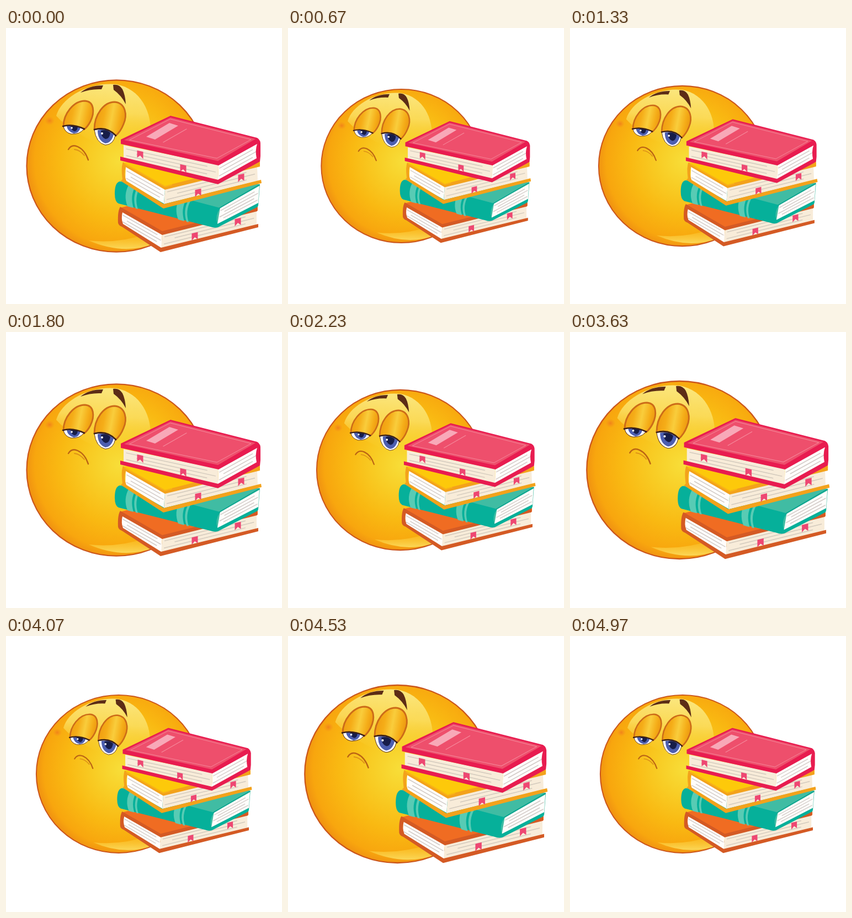
An HTML page for the animation above (5010 ms loop, 500 px wide and 500 px high).

```html
<!DOCTYPE html>
<html lang="en">
<head>
<meta charset="utf-8">
<title>Tired face with books</title>
<style>
html, body { margin: 0; width: 100%; height: 100%; overflow: hidden; background: #fff; }
svg { display: block; width: 100%; height: 100%; }
</style>
</head>
<body>
<svg viewBox="0 0 500 500">
  <defs>
    <radialGradient id="skin" gradientUnits="userSpaceOnUse" cx="206" cy="240" r="175">
      <stop offset="0" stop-color="#f8de39"/>
      <stop offset=".3" stop-color="#f8cd25"/>
      <stop offset=".62" stop-color="#f9b912"/>
      <stop offset=".88" stop-color="#f8a60e"/>
      <stop offset="1" stop-color="#ee8c12"/>
    </radialGradient>
    <linearGradient id="gloss" gradientUnits="userSpaceOnUse" x1="185" y1="103" x2="178" y2="212">
      <stop offset="0" stop-color="#fbe67c"/>
      <stop offset=".45" stop-color="#fbdf62" stop-opacity=".85"/>
      <stop offset="1" stop-color="#f8d232" stop-opacity="0"/>
    </linearGradient>
    <linearGradient id="chin" x1="0" y1="0" x2="0" y2="1">
      <stop offset="0" stop-color="#fbc62a" stop-opacity=".3"/>
      <stop offset="1" stop-color="#fbd858"/>
    </linearGradient>
    <linearGradient id="lid" x1="0" y1=".4" x2="1" y2=".6">
      <stop offset="0" stop-color="#ef9a10"/>
      <stop offset=".3" stop-color="#f5ad18"/>
      <stop offset=".55" stop-color="#f9cd3c"/>
      <stop offset=".8" stop-color="#f5ad18"/>
      <stop offset="1" stop-color="#ea930f"/>
    </linearGradient>
    <radialGradient id="blush">
      <stop offset="0" stop-color="#f07a1c" stop-opacity=".8"/>
      <stop offset="1" stop-color="#f58a1c" stop-opacity="0"/>
    </radialGradient>
  </defs>

  <g id="scene">
    <g id="face">
      <ellipse cx="200" cy="250" rx="162.5" ry="155.7" fill="url(#skin)" stroke="#cb561c" stroke-width="2.2"/>
      <path d="M91 159C100 126 150 97 200 102C243 110 267 152 261 200Q228 222 180 215Q118 190 91 159Z" fill="url(#gloss)"/>
      <path d="M150 385Q205 391 258 372L268 391Q212 412 150 385Z" fill="url(#chin)"/>
      <ellipse cx="79" cy="168" rx="9" ry="8" fill="url(#blush)"/>

      <g stroke-linecap="round" stroke-linejoin="round">
        <path d="M104 178C104 156 122 132 143 132C160 133 161 153 153 169Q148 179 141 184Q121 175 104 178Z" fill="url(#lid)" stroke="#cc6b18" stroke-width="2.8"/>
        <path d="M104 178Q122 174 141 183Q134 193 118 192Q106 189 104 178Z" fill="#fff" stroke="#5b3520" stroke-width="1"/>
        <path d="M110 178Q122 174 135 180Q133 190 123 191Q112 188 110 178Z" fill="#4c5eb0"/>
        <path d="M117 178Q124 175 130 179Q129 187 124 187Q118 185 117 178Z" fill="#171d49"/>
        <circle cx="119" cy="181" r="1.8" fill="#fff"/>
        <path d="M103 178Q121 173 142 183" fill="none" stroke="#3b2017" stroke-width="2.5"/>

        <path d="M160 184C160 157 177 134 197 134C217 136 220 158 213 174Q208 187 199 195Q182 180 160 184Z" fill="url(#lid)" stroke="#cc6b18" stroke-width="2.8"/>
        <path d="M160 184Q183 180 198 194Q195 211 180 212Q163 208 160 184Z" fill="#fff" stroke="#5b3520" stroke-width="1"/>
        <path d="M166 185Q183 181 195 193Q191 208 180 209Q166 204 166 185Z" fill="#4c5eb0"/>
        <path d="M172 186Q182 183 189 190Q187 202 180 201Q172 198 172 186Z" fill="#171d49"/>
        <circle cx="174" cy="191" r="2" fill="#fff"/>
        <path d="M160 184Q183 178 199 195" fill="none" stroke="#3b2017" stroke-width="2.7"/>

        <path d="M113 220Q119 210 130 215Q143 221 149 239" fill="none" stroke="#bb6414" stroke-width="2.4"/>
        <path d="M124 220Q134 221 142 231" fill="none" stroke="#dd9118" stroke-width="1.8"/>
      </g>
      <path d="M135 117Q150 104 176 104L173 111Q153 110 135 117Z" fill="#5c2c16"/>
      <path d="M194 103Q205 101 211 111Q216 121 217 138Q209 122 195 112Z" fill="#5c2c16"/>
    </g>
    <g id="books"></g>
  </g>
</svg>
<script>
const books = document.getElementById('books');
const scene = document.getElementById('scene');
const add = html => books.insertAdjacentHTML('beforeend', html);
const shape = (d, fill, extra = '') => add(`<path d="${d}" fill="${fill}" ${extra}/>`);
const line = (d, color, width) =>
  shape(d, 'none', `stroke="${color}" stroke-width="${width}" stroke-linecap="round" stroke-linejoin="round"`);
const mix = (a, b, k) => [a[0] + (b[0] - a[0]) * k, a[1] + (b[1] - a[1]) * k];

// Page block: corners run clockwise from top left, ruled with broken sheet lines.
function pages(a, b, c, d, fill, ink, count = 3) {
  shape(`M${a}L${b}L${c}L${d}Z`, fill);
  for (let i = 1; i <= count; i++) {
    const k = i / (count + 1), l = mix(a, d, k), r = mix(b, c, k);
    const from = i % 2 ? 0.03 : 0.14, to = i % 2 ? 0.88 : 0.97;
    line(`M${mix(l, r, from)}L${mix(l, r, to)}`, ink, 1.5);
  }
}
const ribbon = (x, y, tilt) =>
  shape('M-5.5-6L5.5-6L5.5 7L0 2L-5.5 7Z', '#ee4772', `transform="translate(${x} ${y}) skewY(${tilt})"`);

const CREAM = '#f8ecd9', RULE = '#d3cabd', WHITE = '#fffdfb', GREY = '#d2cbc8';

// Orange book
shape('M206 326L230 320L400 322L456 324L456 331L283 374L209 335Z', '#f06c22');
pages([210, 332], [283, 373], [281, 398], [209, 356], WHITE, GREY);
pages([283, 373], [454, 331], [454, 356], [281, 399], CREAM, RULE);
shape('M207 324Q202 331 203 353Q204 358 210 360L280 406L457 361L457 355L281 398L212 355Q208 345 211 334L283 375L455 332L455 325L283 368Z', '#d45a24');
ribbon(420, 351, -14);
ribbon(342, 377, -14);

// Teal book
shape('M206 278L300 270L460 283L457 322L384 360Z', '#40bca3');
pages([388, 326], [459, 286], [457, 317], [383, 355], WHITE, GREY, 4);
shape('M206 278L388 326Q378 340 383 355L457 317L456 324L384 361Q378 363 370 360L204 318Q197 315 197 300Q197 280 206 278Z', '#06b09a');
for (const [x, y] of [[0, 0], [92, 24]]) {
  shape('M223 283L235 286Q224 304 231 326L220 323Q212 302 223 283ZM239 287L243 288Q232 307 239 328L235 327Q228 306 239 287Z',
    '#58cbb4', `transform="translate(${x} ${y})"`);
}
line('M387 326L459 284', '#0aa48f', 1.8);

// Yellow book
shape('M211 244L300 236L460 242L460 250L287 292L213 252Z', '#fdc90a');
pages([217, 251], [288, 291], [286, 318], [216, 278], WHITE, GREY);
pages([288, 291], [455, 250], [456, 277], [286, 319], CREAM, RULE);
shape('M212 243Q208 252 211 274L208 277L285 327L463 281L462 275L286 319L218 277Q213 265 217 252L288 293L460 251L460 243L288 286Z', '#f3a21b');
line('M215 246L288 287L300 284', '#f9b714', 2);
ribbon(426, 271, -14);
ribbon(348, 298, -14);

// Pink book
pages([213, 212], [385, 248], [384, 276], [213, 236], CREAM, RULE);
pages([385, 248], [455, 209], [455, 237], [384, 276], WHITE, GREY);
shape('M298 159L455 199Q462 203 461 213L461 232L460 242L384 283L207 240L207 233L384 275L454 236Q451 222 455 210L385 249L208 210L208 202Z', '#e81c50');
shape('M298 162L452 201L384 241L214 203Z', '#ee4f6c');
line('M298 165L444 202L382 236L224 203Z', '#f58a9c', 1);
shape('M296 172L312 177L270 202L254 197Z', '#f8a9b8');
line('M327 183L285 207', '#f58a9c', 1.2);
ribbon(243, 229, 13);
ribbon(321, 254, 13);

// Pulse: [step, scale] within a cycle of 27 steps.
const CYCLE = 27, LAST = 149, LOOP = 5010;
const pulse = [[0, 1], [1, 1.034], [4, 1.141], [5, 1.141], [9, 1.0235], [10, 1], [13, 0.932],
  [14, 0.918], [16, 0.897], [18.5, 0.886], [21, 0.897], [23, 0.921], [26, 0.978], [27, 1]];

function scaleAt(step) {
  const p = step % CYCLE;
  const i = pulse.findIndex(key => key[0] > p);
  const [p0, s0] = pulse[i - 1], [p1, s1] = pulse[i];
  return s0 + (s1 - s0) * (p - p0) / (p1 - p0);
}
function draw(now) {
  const t = Math.floor(now % LOOP / 10) * 10;
  const step = Math.min(LAST, Math.floor((t + 5) * 0.03));
  scene.setAttribute('transform', `translate(250 250) scale(${scaleAt(step)}) translate(-250 -250)`);
  requestAnimationFrame(draw);
}
draw(performance.now());
</script>
</body>
</html>
```
